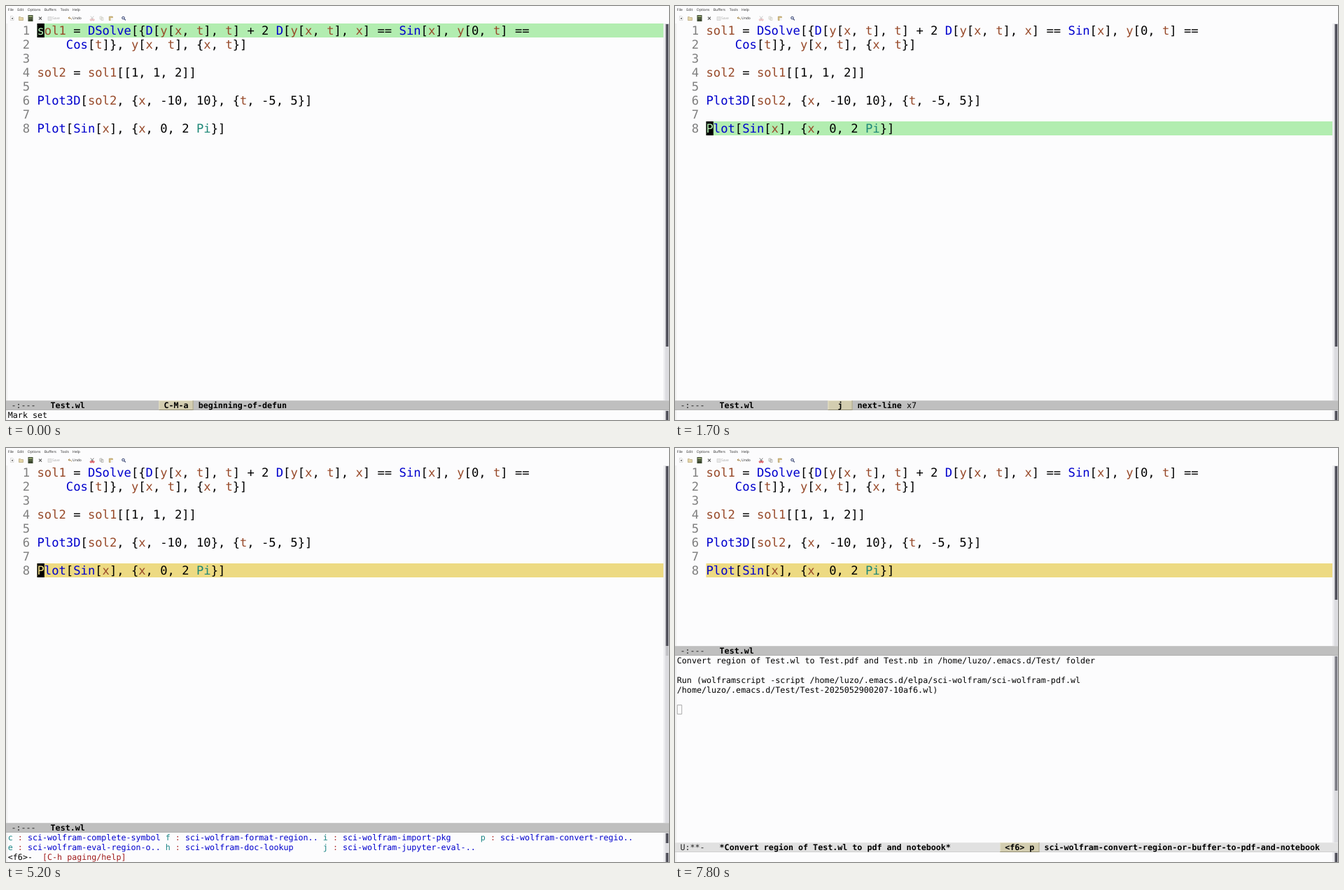
Recreate the animation shown at these times as an HTML page. Size 947 by 592 pixels, loop 8 s.

```html
<!DOCTYPE html>
<html lang="en">
<head>
<meta charset="utf-8">
<title>Editor session</title>
<style>
html, body { margin: 0; width: 100%; height: 100%; overflow: hidden; background: #fcfcfd; }
svg { display: block; width: 947px; height: 592px; }
text { font: 11.68px "DejaVu Sans Mono", monospace; white-space: pre; text-rendering: geometricPrecision; }
.code { font-size: 17.18px; }
.num { font-size: 17.18px; fill: #7f7f7f; }
.menu { font: 5px "Noto Sans", sans-serif; fill: #333; }
.b { font-weight: bold; }
.fn { fill: #0000cd; }
.var { fill: #984a2a; }
.const { fill: #1f8878; }
.key { fill: #1a8585; }
.sep { fill: #b03030; }
.hint { fill: #a01c1c; }
.dim { fill: #aaa; }
</style>
</head>
<body>
<svg id="stage" viewBox="0 0 947 592"></svg>
<script>
const LOOP = 8000, CW = 10.343, SW = 7.032, LEFT = 44.5, EDGE = 2.8;
const VISUAL = 2000, ECHO = 4000, MENU = 4700, RUN = 5300;
const stage = document.getElementById('stage');

const code = [
  'sol1 = DSolve[{D[y[x, t], t] + 2 D[y[x, t], x] == Sin[x], y[0, t] ==',
  '    Cos[t]}, y[x, t], {x, t}]',
  '',
  'sol2 = sol1[[1, 1, 2]]',
  '',
  'Plot3D[sol2, {x, -10, 10}, {t, -5, 5}]',
  '',
  'Plot[Sin[x], {x, 0, 2 Pi}]'
];
const menu = [
  ['c', 'complete-symbol', 'f', 'format-region..', 'i', 'import-pkg', 'p', 'convert-regio..'],
  ['e', 'eval-region-o..', 'h', 'doc-lookup', 'j', 'jupyter-eval-..']
];
const output = [
  [308, 'Convert region of Test.wl to Test.pdf and Test.nb in /home/luzo/.emacs.d/Test/ folder'],
  [336, 'Run (wolframscript -script /home/luzo/.emacs.d/elpa/sci-wolfram/sci-wolfram-pdf.wl'],
  [350, '/home/luzo/.emacs.d/Test/Test-2025052900207-10af6.wl)']
];

const esc = s => s.replace(/&/g, '&amp;').replace(/</g, '&lt;');
const span = (cls, s) => `<tspan class="${cls}">${esc(s)}</tspan>`;
const rect = (x, y, w, h, fill) => `<rect x="${x}" y="${y}" width="${w}" height="${h}" fill="${fill}"/>`;
const path = (d, stroke, fill = 'none', w = 0.8) => `<path d="${d}" stroke="${stroke}" fill="${fill}" stroke-width="${w}"/>`;
const raw = (x, y, s, cls = '', fill = '') =>
  `<text x="${x}" y="${y}" class="${cls}"${fill && ` fill="${fill}"`}>${s}</text>`;
const text = (x, y, s, cls, fill) => raw(x, y, esc(s), cls, fill);

const paint = s => s.replace(/\b(?:(DSolve|Plot3D|Plot|Sin|Cos|D)|(sol\d|[xyt])|(Pi))\b/g,
  (m, fn, v) => span(fn ? 'fn' : v ? 'var' : 'const', m));

function toolbar(region) {
  const names = [['File', 2.8], ['Edit', 16.3], ['Options', 30.8], ['Buffers', 54.8], ['Tools', 77.8], ['Help', 95]];
  const cut = region ? '#d01820' : '#e3a5a5', blade = region ? '#555' : '#bbb';
  return names.map(([s, x]) => text(x, 7, s, 'menu')).join('') +
    path('M6.5 14.5h3l1.5 1.5v4.5h-4.5z', '#c4c4c4', '#fff', 0.6) + rect(8, 16.8, 2, 2, '#777') +
    path('M18.5 20.5v-5h2l1 1h3v4z', '#a89468', '#e4d5a8', 0.6) +
    rect(31.5, 13, 7, 9, '#3d4a32') + rect(32.5, 14, 5, 2, '#93a370') + rect(32.5, 17.5, 5, 0.7, '#82915f') +
    path('M47 15.7l4 4m0-4l-4 4', '#555', 'none', 1.1) +
    path('M60 15.5h5v5h-5z', '#ccc', '#e8e8e8', 0.6) + text(66, 19.3, 'Save', 'menu dim') +
    path('M93.5 19.5q0-3-4-2.5m1.5-1.5l-2 1.5l2 1.5', '#98742c') + text(95, 19.3, 'Undo', 'menu') +
    path('M121 14.5l3 4.5m1.2-4.5l-3 4.5', blade) +
    `<circle cx="121.5" cy="19.8" r="1.2" fill="none" stroke="${cut}"/><circle cx="124.8" cy="19.8" r="1.2" fill="none" stroke="${cut}"/>` +
    path('M134 15h3v4h-3zM136 16.5h3v4h-3z', region ? '#999' : '#c8c8c0', '#f4f4ee', 0.6) +
    path('M147.3 15h5v5.5h-5z', '#a58b50', '#d5bd83', 0.6) + rect(149.5, 17, 3.5, 4, '#f4f4f4') +
    `<circle cx="167.5" cy="17" r="1.8" fill="#dde4f4" stroke="#35406e"/>` + path('M169 18.5l1.8 1.8', '#35406e', 'none', 1.2);
}

function modeline(y, flags, name, active = true) {
  return rect(0, y, 947, 14, active ? '#bfbfbf' : '#e1e1e1') +
    rect(0, y, 947, 0.6, active ? '#d2d2d2' : '#eee') + rect(0, y + 13.4, 947, 0.6, active ? '#a8a8a8' : '#c4c4c4') +
    text(7.4, y + 11, flags, '', '#222') + text(63.6, y + 11, name, 'b');
}

function keycast(x, key, command, count = 1) {
  const w = key.length * SW, cmdX = x + w + SW;
  return rect(x, 564, w, 14, '#d3cdb0') + rect(x, 564, w, 1, '#e6e1cb') + rect(x, 564, 1, 14, '#e6e1cb') +
    rect(x, 577, w, 1, '#918c74') + rect(x + w - 1, 564, 1, 14, '#a8a38a') +
    text(x, 575, key, 'b') + text(cmdX, 575, command, 'b') +
    (count > 1 ? text(cmdX + command.length * SW, 575, ' x' + count) : '');
}

const thumb = (y, h, fill = '#50505a') => rect(942.5, y, 3.7, h, fill);

// Cursor blinks with a half-second beat after the latest command.
function cursorOn(t) {
  const last = t < 1100 ? 0 : t < VISUAL ? 1700 : t < RUN ? VISUAL : RUN;
  return t < last || Math.floor((t - last) / 500) % 2 === 0;
}

function editor(t, line) {
  const top = 5 + 20 * line, hl = t < VISUAL ? '#b2edb0' : '#edda82';
  let s = rect(LEFT, top, 939 - LEFT, 20, hl);
  code.forEach((src, i) => {
    const y = 41 + 20 * i;
    s += text(LEFT - 2 * CW, y, String(i + 1), 'num') + raw(LEFT, y, paint(src), 'code');
  });
  if (cursorOn(t)) {
    s += rect(LEFT, top, CW, 20, '#000') + text(LEFT, top + 16, code[line - 1][0] || '', 'code', hl);
  }
  return s;
}

function keyMenu() {
  let s = modeline(536, '-:---', 'Test.wl') + thumb(283, 14, '#c2c2c6') + thumb(551, 14);
  menu.forEach((row, r) => {
    for (let i = 0; i < row.length; i += 2) {
      s += raw(EDGE + 16 * i * SW, 561 + 14 * r,
        span('key', row[i]) + span('sep', ' : ') + span('fn', 'sci-wolfram-' + row[i + 1]));
    }
  });
  return s + raw(EDGE, 589, '&lt;f6&gt;-  ' + span('hint', '[C-h paging/help]'));
}

function results() {
  return modeline(283, '-:---', 'Test.wl') +
    output.map(([y, s]) => text(EDGE, y, s)).join('') +
    path('M3.3 367.5h6.4v13h-6.4z', '#999', 'none', 0.8) +
    thumb(298, 192, '#7c7c84') +
    modeline(564, 'U:**-', '*Convert region of Test.wl to pdf and notebook*', false) +
    keycast(464.2, ' <f6> p ', 'sci-wolfram-convert-region-or-buffer-to-pdf-and-notebook');
}

function prompt(t, moves) {
  const cast = t < 1100 ? [' C-M-a ', 'beginning-of-defun']
    : t < VISUAL ? ['  j  ', 'next-line', moves] : ['  V  ', 'evil-visual-line'];
  const echo = t < 1100 ? 'Mark set' : t < VISUAL ? '' : t < ECHO ? '-- VISUAL LINE --' : '<f6>-';
  return modeline(564, '-:---', 'Test.wl') + keycast(218.4, ...cast) + text(EDGE, 589, echo);
}

function draw(t) {
  const moves = Math.max(0, Math.min(7, Math.floor((t - 1000) / 100)));
  const thumbEnd = t < MENU ? 487 : t < RUN ? 283 : 217;
  return rect(0, 0, 947, 592, '#fcfcfd') + rect(0, 25, 2.5, 567, '#f1f1f1') + rect(939, 25, 8, 567, '#ededf0') +
    rect(941.5, 25, 5.5, 567, '#dcdce0') + thumb(26, thumbEnd - 26) + thumb(579, 13) +
    toolbar(t >= VISUAL) + editor(t, moves + 1) +
    (t < MENU ? prompt(t, moves) : t < RUN ? keyMenu() : results());
}

let shown = '';
function tick(now) {
  const next = draw(now % LOOP);
  if (next !== shown) stage.innerHTML = shown = next;
  requestAnimationFrame(tick);
}
tick(performance.now());
</script>
</body>
</html>
```
